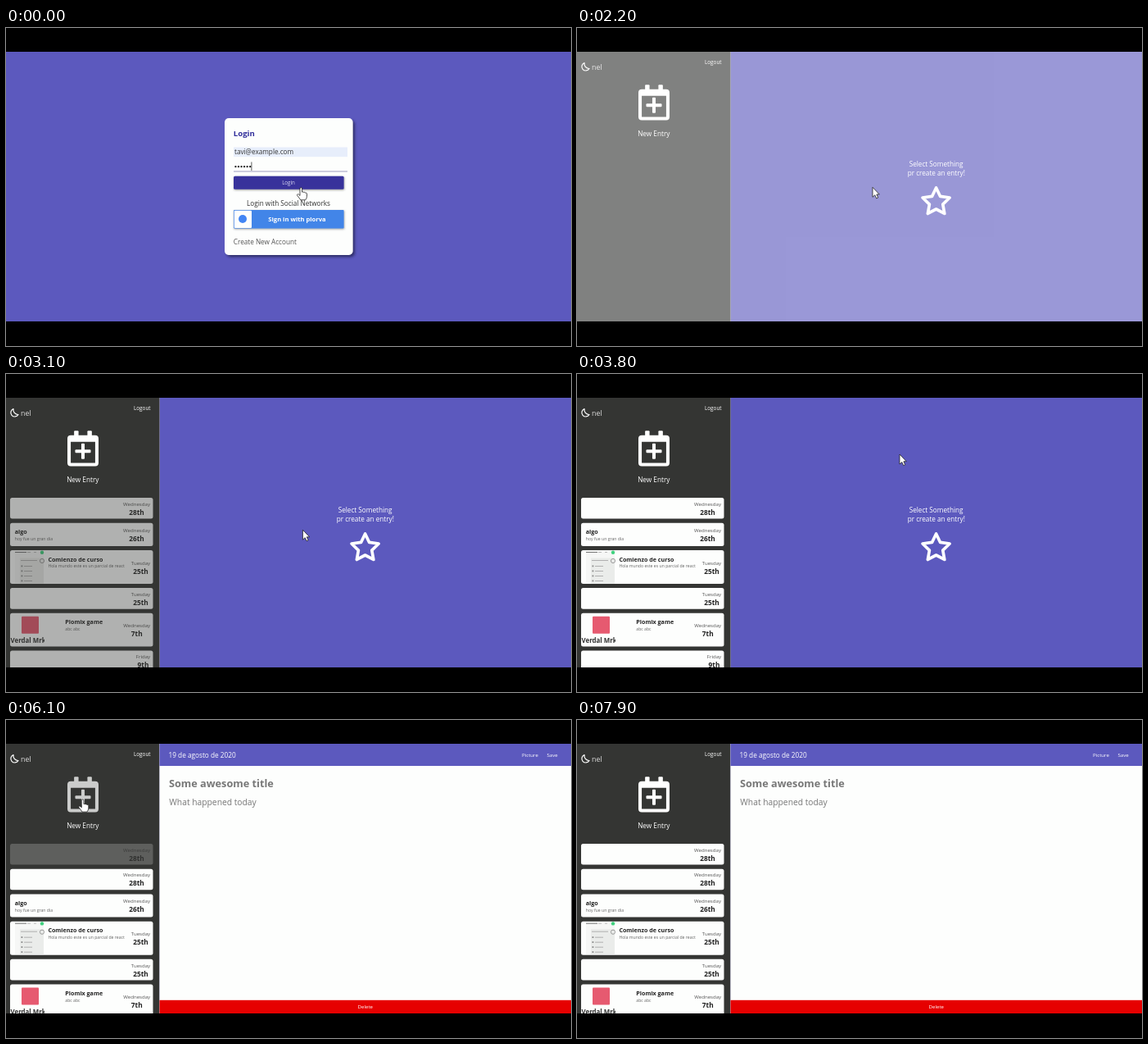
An HTML page that plays this animation: 690 px wide and 388 px high, repeating every 8000 ms.

```html
<!DOCTYPE html>
<html lang="es">
<head>
<meta charset="utf-8">
<title>Journal</title>
<style>
  html, body { margin: 0; width: 100%; height: 100%; overflow: hidden; background: #000; }
  svg { display: block; width: 100vw; height: 100vh; }
  text { font-family: "Open Sans", "Noto Sans", sans-serif; white-space: pre; }
</style>
</head>
<body>
<svg id="stage" viewBox="0 0 690 388"></svg>
<script>
const LOOP = 8000, STEP = 100, FADE = 500;
const PURPLE = '#5c59be', PAPER = '#fdfefd';

const text = (x, y, size, fill, str, { bold = false, anchor = 'start' } = {}) =>
  `<text x="${x}" y="${y}" font-size="${size}" fill="${fill}" text-anchor="${anchor}"` +
  `${bold ? ' font-weight="700"' : ''}>${str}</text>`;
const rect = (x, y, w, h, fill, r = 0) =>
  `<rect x="${x}" y="${y}" width="${w}" height="${h}" rx="${r}" fill="${fill}"/>`;
const mid = { anchor: 'middle' };

function loginView() {
  const dots = Array.from({ length: 6 }, (_, i) =>
    `<circle cx="${280.4 + i * 3.55}" cy="169.2" r="1.15" fill="#222"/>`).join('');
  return rect(0, 29, 690, 329, PURPLE) +
    `<g filter="url(#shadow)">${rect(267, 110, 156.5, 167, PAPER, 5)}</g>` +
    text(277.8, 131.6, 9.6, '#302d9a', 'Login', { bold: true }) +
    `<rect id="email" x="278" y="145.5" height="11.7" fill="#e7eefb"/>` +
    text(279, 154, 8.2, '#333', 'tavi@example.com') + dots +
    `<rect id="caret" x="299.5" y="163.5" width=".8" height="10.5" fill="#333"/>` +
    `<rect id="underline" x="278" y="174.6" height=".8"/>` +
    `<g filter="url(#soft)">${rect(278, 180.7, 134.6, 16, '#37339b', 1.5)}` +
    `${rect(278, 222, 134.6, 22.6, '#4285e8', 1)}</g>` +
    text(345, 190.8, 6.2, '#d9d8f2', 'Login', mid) +
    text(345, 216.6, 8.2, '#333', 'Login with Social Networks', mid) +
    rect(278.7, 222.7, 21.3, 21.2, PAPER, 1) +
    '<circle cx="289" cy="233" r="5" fill="#4285f4"/>' +
    text(355.5, 235.8, 7.6, '#fff', 'Sign in with plorva', { bold: true, ...mid }) +
    text(277.8, 264.2, 8.2, '#555', 'Create New Account');
}

function starPath(cx, cy, outer, inner) {
  const points = Array.from({ length: 10 }, (_, i) => {
    const angle = -Math.PI / 2 + i * Math.PI / 5, r = i % 2 ? inner : outer;
    return `${cx + r * Math.cos(angle)},${cy + r * Math.sin(angle)}`;
  });
  return `<polygon points="${points.join(' ')}" fill="none" stroke="#fff" stroke-width="3.7" stroke-linejoin="round"/>`;
}

const calendar = `<g id="calendar" transform="translate(75 69.2) scale(.0848)">
  <path fill-rule="evenodd" d="M48 64H400a48 48 0 0 1 48 48V464a48 48 0 0 1-48 48H48a48 48 0 0 1-48-48V112a48 48 0 0 1 48-48Z
    M48 160V464H400V160Z"/>
  <rect x="96" width="64" height="90" rx="12"/><rect x="288" width="64" height="90" rx="12"/>
  <rect x="112" y="272" width="224" height="48" rx="12"/><rect x="200" y="184" width="48" height="224" rx="12"/></g>`;

const screenshot = rect(11, .8, 35, 39.5, '#f6f7f6') + rect(17, 9.5, 29, 31, '#eaecea') +
  rect(11, 2, 14, 1, '#777') + rect(26, 2, 4, 1, '#bbb') + rect(34, 2, 3, 1, '#bbb') +
  '<circle cx="44" cy="2.7" r="2.2" fill="#3fd17e"/>' +
  '<circle cx="44" cy="13" r="2.6" fill="none" stroke="#888" stroke-width=".8"/>' +
  [12, 19, 25, 31, 37].map((y, i) => rect(i ? 22 : 18, y, i ? 10 : 20, .9, '#aaa') +
    (i ? rect(18.5, y - .5, 1.8, 1.8, '#888') : '')).join('');

const shopLogo = rect(19, 4, 21, 21, '#e65a70', 1) +
  `<svg x="5" y="27" width="42" height="13">${text(.5, 9.2, 7.9, '#333', 'Verdal Mrk', { bold: true })}</svg>`;

const entries = [
  { h: 25.6, day: 'Wednesday', date: '28th', x: 159.5 },
  { h: 28.2, day: 'Wednesday', date: '26th', x: 159.5, title: 'algo', body: 'hoy fue un gran dia', left: 10.8 },
  { h: 41, day: 'Tuesday', date: '25th', x: 164.5, title: 'Comienzo de curso',
    body: 'Hola mundo este es un parcial de react', left: 51.4, art: screenshot },
  { h: 25.6, day: 'Tuesday', date: '25th', x: 164.5 },
  { h: 40.7, day: 'Wednesday', date: '7th', x: 159.7, title: 'Plomix game', body: 'abc abc', left: 72.3, art: shopLogo },
  { h: 25.6, day: 'Friday', date: '9th', x: 167.5 },
];

function entryCard({ h, day, date, x, title, body, left, art = '' }, y) {
  const c = h / 2;
  return `<g transform="translate(0 ${y})">` + rect(5, 0, 174.5, h, PAPER, 2.5) + art +
    (title ? text(left, 13.6, 7.15, '#222', title, { bold: true }) + text(left, 21.2, 5.15, '#666', body) : '') +
    text(x, c - 3, 6.1, '#555', day, mid) +
    text(x, c + 8, 8.3, '#222', date, { bold: true, ...mid }) + '</g>';
}

function entryList() {
  let y = 151;
  return entries.map(entry => {
    const card = entryCard(entry, y);
    y += entry.h + 5.1;
    return card;
  }).join('');
}

function journalView() {
  return rect(0, 29, 690, 329, '#fff') + '<g id="journal">' +
    rect(187.5, 29, 502.5, 329, PURPLE) + rect(0, 29, 187.5, 329, '#343533') +
    '<path d="M9 42.5A4.9 4.9 0 1 0 15 49.5A5.8 5.8 0 0 1 9 42.5Z" fill="none" stroke="#fff" stroke-width="1.2" stroke-linejoin="round"/>' +
    text(18, 50.6, 8.8, '#ddd', 'nel') + text(156, 44, 6.35, '#fff', 'Logout') + calendar +
    text(93.8, 132.4, 8.25, '#fff', 'New Entry', mid) +
    text(438.6, 169, 8.2, '#fff', 'Select Something', mid) +
    text(438.8, 180.2, 8.2, '#fff', 'pr create an entry!', mid) + starPath(438.6, 212.4, 17.4, 8.6) +
    `<g id="list">${entryList()}</g><g id="added">${entryCard(entries[0], 151)}</g></g>` +
    '<g id="note">' + rect(187.5, 29, 502.5, 329, PAPER) + rect(187.5, 29, 502.5, 27, PURPLE) +
    text(198.5, 46.2, 8.25, '#fff', '19 de agosto de 2020') +
    text(630, 45.2, 6.15, '#fff', 'Picture') + text(660.4, 45.2, 6.15, '#fff', 'Save') +
    text(199, 81.8, 12.7, '#777', 'Some awesome title', { bold: true }) +
    text(199.3, 103.6, 10.3, '#777', 'What happened today') +
    rect(187.5, 341.8, 502.5, 16.2, '#e60000') + text(438.8, 352.4, 6.1, '#fff', 'Delete', mid) + '</g>';
}

const pointers = `<g id="cursor" fill="#fff" stroke="#222" stroke-width=".8" stroke-linejoin="round">
  <path id="arrow" d="M0 0V12L2.8 9.5L4.7 13.6L6.7 12.7L4.9 8.7H8.3Z"/>
  <path id="hand" d="M-1.3 1A1.3 1.3 0 0 1 1.3 1V5.2Q2.6 4.5 3.4 5.5Q4.6 5 5.2 6Q6.8 5.7 7.2 7.2V10.2Q7 12.8 5.4 14.8H-.6
    Q-2.4 11.8-4.6 9.4Q-5.2 8.2-4 7.7Q-2.8 7.7-1.3 9.5Z"/></g>`;

document.getElementById('stage').innerHTML = `<defs>
  <filter id="shadow" x="-10%" y="-10%" width="125%" height="125%">
    <feDropShadow dx="2.5" dy="2.5" stdDeviation="1.7" flood-color="#24224f" flood-opacity=".75"/></filter>
  <filter id="soft"><feDropShadow dx=".5" dy="1" stdDeviation=".8" flood-color="#333" flood-opacity=".5"/></filter>
  <clipPath id="screen"><rect y="29" width="690" height="329"/></clipPath></defs>
  ${rect(0, 0, 690, 388, '#000')}
  <g clip-path="url(#screen)"><g id="loginView">${loginView()}</g><g id="journalView">${journalView()}</g>${pointers}</g>`;

const el = {};
document.querySelectorAll('svg [id]').forEach(node => el[node.id] = node);
const show = (node, on) => node.setAttribute('display', on ? 'inline' : 'none');
const clamp = v => Math.min(1, Math.max(0, v));

// cubic-bezier(.25, .1, .25, 1), solved by bisection
function ease(x) {
  const bezier = (a, b, s) => 3 * a * s * (1 - s) ** 2 + 3 * b * s * s * (1 - s) + s ** 3;
  let low = 0, high = 1;
  for (let i = 0; i < 24; i++) {
    const s = (low + high) / 2;
    if (bezier(.25, .25, s) < x) low = s; else high = s;
  }
  return bezier(.1, 1, low);
}
const fade = (t, start) => ease(clamp((t - start) / FADE));

// time, x, y of the pointer tip
const route = [
  [0, 360.3, 195], [2000, 360.3, 195], [2100, 361, 194.3], [3000, 361, 194.3], [3800, 394, 98],
  [4700, 99, 103], [5100, 93.6, 97.3], [7000, 93.6, 97.3], [7600, 702, 180], [LOOP, 702, 180],
];
function pointerAt(t) {
  const i = route.findIndex((stop, k) => k > 0 && t <= stop[0]);
  const [t0, x0, y0] = route[i - 1], [t1, x1, y1] = route[i];
  const p = (t - t0) / (t1 - t0), s = p * p * (3 - 2 * p);
  return [x0 + (x1 - x0) * s, y0 + (y1 - y0) * s];
}

function render(t) {
  const inJournal = t >= 2100, focused = t < 1000, created = t >= 6100;
  show(el.loginView, !inJournal);
  show(el.journalView, inJournal);

  show(el.caret, t < 800 || (t >= 1300 && t < 1800));
  el.email.setAttribute('width', focused ? 139 : 136);
  el.underline.setAttribute('width', focused ? 139 : 138);
  el.underline.setAttribute('fill', focused ? '#8583ae' : '#d5d5e2');

  el.journal.setAttribute('opacity', fade(t, 2020));
  el.list.setAttribute('opacity', fade(t, 2920));
  el.list.setAttribute('transform', `translate(0 ${created ? 30.7 : 0})`);
  el.added.setAttribute('opacity', fade(t, 6020));
  show(el.note, created);

  const [x, y] = pointerAt(t);
  const hovering = inJournal && x > 75 && x < 113;
  el.cursor.setAttribute('transform', `translate(${x} ${y})`);
  show(el.hand, !inJournal || hovering);
  show(el.arrow, inJournal && !hovering);
  el.calendar.setAttribute('fill', hovering ? '#cbcccb' : '#fff');
}

const start = performance.now();
function tick() {
  const t = (performance.now() - start) % LOOP;
  render(Math.floor(t / STEP) * STEP);
  requestAnimationFrame(tick);
}
tick();
</script>
</body>
</html>
```
